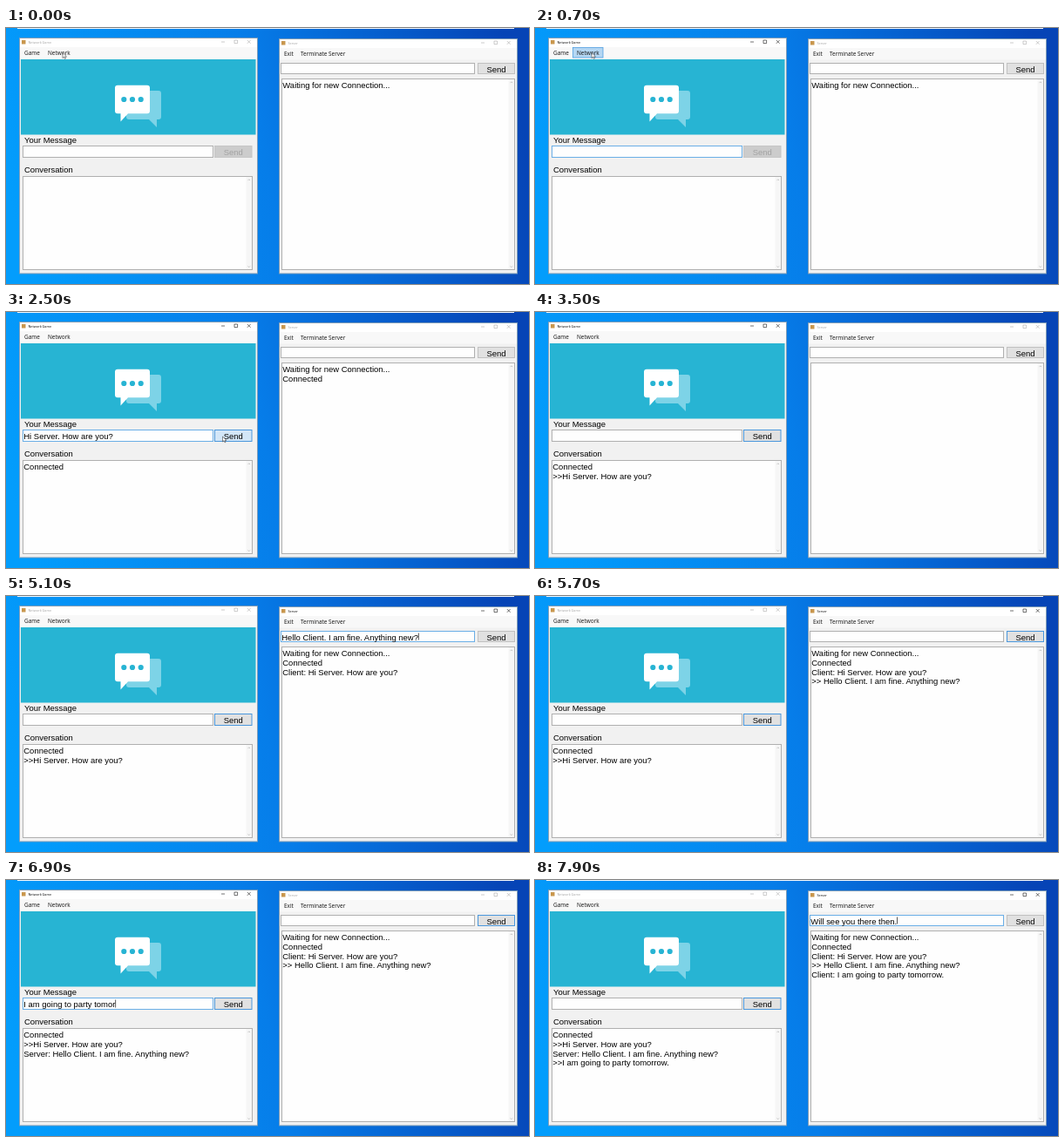
An HTML page that plays this animation: 600 by 294 pixels, repeating every 8000 ms.

```html
<!DOCTYPE html>
<html lang="en">
<head>
<meta charset="utf-8">
<title>Client and server chat</title>
<style>
  html, body { margin: 0; width: 100%; height: 100%; overflow: hidden; background: #0a78dc; }
  svg { display: block; width: 600px; height: 294px; }
  text { font: 9.46px "Liberation Sans", Arial, sans-serif; fill: #000; white-space: pre; }
  .menu { font: 6.45px "Open Sans", sans-serif; fill: #111; }
  .title { font: 3.8px "Open Sans", sans-serif; fill: #000; }
  .mid { text-anchor: middle; }
  .frame { fill: #f1f1f1; stroke: #7f9db8; }
  .box { fill: #fefefe; stroke: #b0b0b0; }
  .btn rect { fill: #e1e1e1; stroke: #c0c0c0; }
  .btn.off rect { fill: #cccccc; stroke: #c6c6c6; }
  .btn.off text { fill: #a2a2a2; }
  .btn.hot rect { fill: #d3e6f7; stroke: #4a97dc; }
  .btn.main rect { stroke: #4a97dc; }
  .box.focus { stroke: #6aaee6; }
  .keys { fill: none; stroke: #111; stroke-width: .6; }
  .pale .title { fill: #a2a2a2; }
  .pale .keys { stroke: #aaa; }
</style>
</head>
<body>
<svg id="stage" viewBox="0 0 600 294">
  <defs>
    <linearGradient id="sky" x1="0" y1=".6" x2="1" y2=".5">
      <stop offset="0" stop-color="#039dfc"/>
      <stop offset=".5" stop-color="#067de9"/>
      <stop offset="1" stop-color="#0644b6"/>
    </linearGradient>
  </defs>
  <rect width="600" height="294" fill="url(#sky)"/>
  <rect x="13" width="570" height="1" fill="#f2f6fa"/>
</svg>
<script>
const LOOP = 8000, TICK = 100, LINE = 10.8;
const stage = document.getElementById('stage');

function add(parent, tag, attrs, text) {
  const el = document.createElementNS('http://www.w3.org/2000/svg', tag);
  for (const k in attrs) el.setAttribute(k, attrs[k]);
  if (text) el.textContent = text;
  return parent.appendChild(el);
}
const rect = (g, x, y, width, height, attrs) => add(g, 'rect', { x, y, width, height, ...attrs });
const label = (g, x, y, text, cls = '') => add(g, 'text', { x, y, class: cls }, text);
const path = (g, d, attrs) => add(g, 'path', { d, ...attrs });

function makeWindow(x, y, title) {
  const g = add(stage, 'g');
  rect(g, x + .5, y + .5, 273, 281.5 - y, { class: 'frame' });
  rect(g, x + 1, y + 1, 272, 10, { fill: '#fff' });
  rect(g, x + 1, y + 11, 272, 13.5, { fill: '#f8f8f8' });
  rect(g, x + 3, y + 3, 4.5, 4.5, { fill: '#c9974e' });
  label(g, x + 10.5, y + 6.6, title, 'title');
  path(g, `M${x + 232} ${y + 5}h4m11-2h3.6v3.6h-3.6zm14.8 0l3.8 3.8m0-3.8l-3.8 3.8`, { class: 'keys' });
  return g;
}

function makeInput(g, x, y, w, h) {
  return {
    box: rect(g, x, y, w, h, { class: 'box' }),
    text: label(g, x + .8, y + 10, ''),
    caret: rect(g, 0, y + 2, .7, h - 4, { fill: '#111' }),
    x: x + .8
  };
}

function makeButton(g, x, y, w, h) {
  const b = add(g, 'g', { class: 'btn' });
  rect(b, x, y, w, h);
  label(b, x + w / 2, y + 10, 'Send', 'mid');
  return b;
}

function makeLog(g, x, y, w, lines) {
  rect(g, x, y, w, 277.5 - y, { class: 'box' });
  rect(g, x + w - 7, y + .6, 6.4, 276.3 - y, { fill: '#f6f6f6' });
  for (const [cy, d] of [[y + 4, -1], [274, 1]])
    path(g, `M${x + w - 5} ${cy - d * .6}l1.3 ${d * 1.3}l1.3 ${-d * 1.3}`, { fill: 'none', stroke: '#999', 'stroke-width': .5 });
  return lines.map(([at, text], i) => ({ at, el: label(g, x + .8, y + 10.4 + i * LINE, text) }));
}

// Client
const client = makeWindow(15, 11, 'Network Game');
const hover = rect(client, 43.5, 22.5, 34.5, 11.5, { fill: '#b5d7f3', stroke: '#4f9fe0', 'stroke-width': .8 });
label(client, 21, 31.2, 'Game', 'menu');
label(client, 48, 31.2, 'Network', 'menu');
rect(client, 17, 36, 269.5, 86.5, { fill: '#27b4d3' });
path(client, 'M141 72h34q3 0 3 3v27q0 3-3 3h-2v9l-9-9h-23q-3 0-3-3v-27q0-3 3-3z', { fill: '#7dd3e7' });
path(client, 'M128 65.7h34q3 0 3 3v26.500q0 3-3 3h-22l-8.500 9.300v-9.300h-3.500q-3 0-3-3v-26.500q0-3 3-3z', { fill: '#fff' });
for (const cx of [135.3, 145, 154.7]) add(client, 'circle', { cx, cy: 82, r: 3.1, fill: '#27b4d3' });
label(client, 21, 131.5, 'Your Message');
label(client, 21, 166.2, 'Conversation');
const clientInput = makeInput(client, 19.5, 135.5, 218, 13);
const clientSend = makeButton(client, 239.5, 135.5, 42.5, 13);
const clientLog = makeLog(client, 19.5, 170.5, 263, [
  [1000, 'Connected'],
  [2700, '>>Hi Server. How are you?'],
  [5800, 'Server: Hello Client. I am fine. Anything new?'],
  [7200, '>>I am going to party tomorrow.']
]);

// Server
const server = makeWindow(313, 12, 'Server');
label(server, 319, 32.2, 'Exit', 'menu');
label(server, 338, 32.2, 'Terminate Server', 'menu');
const serverInput = makeInput(server, 315.5, 40.5, 222, 12);
const serverSend = makeButton(server, 541.5, 40.5, 42, 12);
const serverLog = makeLog(server, 316.5, 58.5, 267, [
  [0, 'Waiting for new Connection...'],
  [1000, 'Connected'],
  [3600, 'Client: Hi Server. How are you?'],
  [5600, '>> Hello Client. I am fine. Anything new?'],
  [7300, 'Client: I am going to party tomorrow.']
]);

const arrow = path(stage, 'M0 0v6l1.5-1.3 1 2.2 1-.5-1-2h2z', { fill: '#fff', stroke: '#222', 'stroke-width': .5 });

// start of typing, end of typing, moment sent, text
const clientTyping = [
  [1200, 2100, 2700, 'Hi Server. How are you?'],
  [6400, 7000, 7200, 'I am going to party tomorrow.']
];
const serverTyping = [
  [4700, 5100, 5600, 'Hello Client. I am fine. Anything new?'],
  [7400, 7900, 8000, 'Will see you there then.']
];

const within = (t, a, b) => t >= a && t < b;
const ramp = (t, a, b) => Math.min(1, Math.max(0, (t - a) / (b - a)));
const show = (el, on) => el.setAttribute('visibility', on ? 'visible' : 'hidden');

function setInput(input, jobs, t, focused) {
  const job = jobs.find(j => within(t, j[0], j[2]));
  const text = job ? job[3].slice(0, Math.ceil(job[3].length * ramp(t, job[0], job[1]))) : '';
  input.text.textContent = text;
  input.box.classList.toggle('focus', focused);
  show(input.caret, !!job && t <= job[1] + 100);
  input.caret.setAttribute('x', input.x + input.text.getComputedTextLength());
}

function draw(t) {
  client.classList.toggle('pale', !(within(t, 300, 4600) || within(t, 6300, 7300)));
  server.classList.toggle('pale', !(within(t, 4600, 6000) || t >= 7300));
  show(hover, within(t, 300, 1000));

  setInput(clientInput, clientTyping, t, within(t, 300, 2600) || within(t, 6300, 7100));
  setInput(serverInput, serverTyping, t, within(t, 4600, 5500) || t >= 7300);

  const state = t < 1000 ? 'off' : within(t, 2400, 2700) ? 'hot' : t >= 2700 ? 'main' : '';
  clientSend.setAttribute('class', 'btn ' + state);
  serverSend.setAttribute('class', 'btn ' + (within(t, 5500, 7300) ? 'main' : ''));

  for (const { at, el } of clientLog) show(el, t >= at);
  const blank = within(t, 3400, 3600);
  for (const { at, el } of serverLog) show(el, t >= at && !blank);

  const k = ramp(t, 2000, 2400), s = k * k * (3 - 2 * k);
  arrow.setAttribute('transform', `translate(${65 + 183.5 * s} ${28.5 + 114.5 * s})`);
  show(arrow, t < 2800);
}

function loop(now) {
  draw(Math.floor((now % LOOP) / TICK) * TICK);
  requestAnimationFrame(loop);
}
draw(0);
requestAnimationFrame(loop);
</script>
</body>
</html>
```
